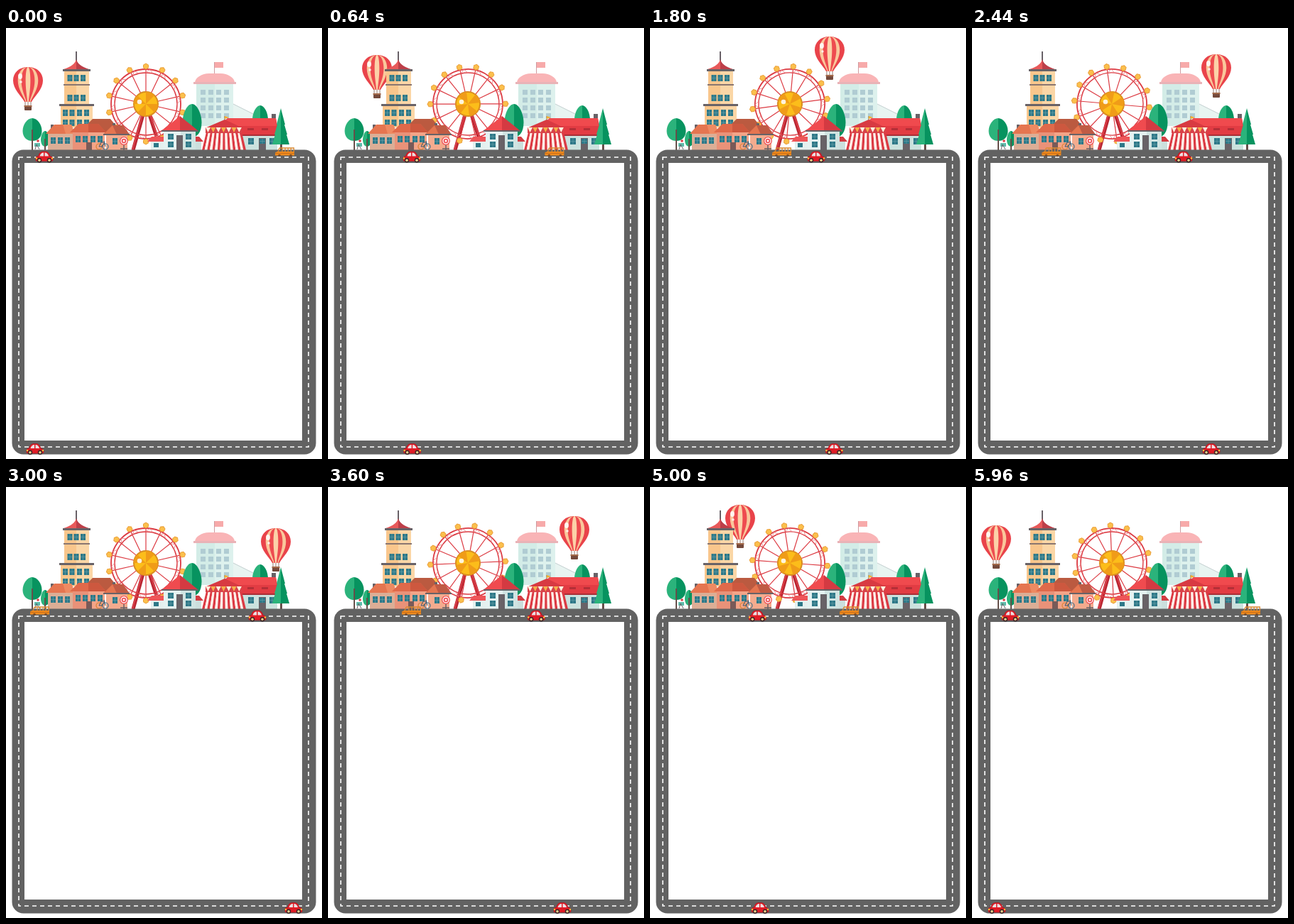
Recreate the animation shown at these times as an HTML page. Size 445 px wide and 607 px high, loop 6 s.

```html
<!DOCTYPE html>
<html lang="en">
<head>
<meta charset="utf-8">
<title>Town road frame</title>
<style>
html, body { margin: 0; width: 100%; height: 100%; overflow: hidden; background: #fff; }
svg { display: block; width: 100vw; height: 100vh; }
</style>
</head>
<body>
<svg id="stage" viewBox="0 0 445 607" xmlns="http://www.w3.org/2000/svg"></svg>
<script>
const LOOP = 6000, STEP = 40, TURN = 3000, LAST = 5960;
const TEAL = '#2d7888', GREY = '#686267', RED = '#dc3a42';

const rect = (x, y, w, h, fill, extra = '') =>
  `<rect x="${x}" y="${y}" width="${w}" height="${h}" fill="${fill}" ${extra}/>`;
const poly = (points, fill) => `<polygon points="${points}" fill="${fill}"/>`;
const path = (d, fill, extra = '') => `<path d="${d}" fill="${fill}" ${extra}/>`;
const line = (d, stroke, width = 1) => path(d, 'none', `stroke="${stroke}" stroke-width="${width}"`);
const circle = (x, y, r, fill, extra = '') => `<circle cx="${x}" cy="${y}" r="${r}" fill="${fill}" ${extra}/>`;
const group = (id, content) => `<g id="${id}">${content}</g>`;
const repeat = (n, draw) => Array.from({ length: n }, (_, i) => draw(i)).join('');

function panes(x, y, w = 7, h = 9) {
  return rect(x, y, w, h, TEAL) +
    line(`M${x + w / 2} ${y}v${h}M${x} ${y + h / 2}h${w}`, '#68a3aa', 0.6);
}
const paneRow = (xs, y, w, h) => xs.map(x => panes(x, y, w, h)).join('');

// Oval crown in two greens; (x, y) is the tip.
function leafTree(x, y, rx, h, trunk) {
  const side = s => `M${x} ${y}C${x + s * rx * 0.5} ${y} ${x + s * rx} ${y + h * 0.28} ${x + s * rx} ${y + h * 0.56}` +
    `S${x + s * rx * 0.55} ${y + h} ${x} ${y + h}Z`;
  return path(side(-1), '#2bb37b') + path(side(1), '#07935f') +
    (trunk ? line(`M${x} ${y + h * 0.5}V172`, '#66504a', 2) : '');
}

function tower() {
  return line('M99 33V48', GREY, 2) +
    path('M99 44Q97 53 81 58H99Z', '#e8595a') + path('M99 44Q101 53 117 58H99Z', '#bd3f49') +
    rect(82, 60, 17, 49, '#f9c68c') + rect(99, 60, 18, 49, '#fbd6a6') +
    rect(77, 110, 22, 30, '#f9c68c') + rect(99, 110, 23, 30, '#fbd6a6') +
    rect(80, 58, 39, 3, GREY) + rect(81, 79, 37, 2, '#8a7670') + rect(75, 107, 49, 3, GREY) +
    [66, 94].map(y => paneRow([86.5, 95.5, 105], y)).join('') +
    [115, 129].map(y => paneRow([80, 89.5, 100, 110], y)).join('');
}

function paleBuilding() {
  return poly('320,107 352,123 362,138 320,138', '#e8f4f1') + line('M320 107L362 128', '#c3cfd0') +
    line('M293.5 48V64', '#cf9ba0') + rect(294, 48, 12, 8, '#f7aaaa') +
    path('M266 77C266 70 276 64 286 64H302C312 64 322 70 322 77Z', '#f9b4b6') +
    rect(268, 79, 26, 59, '#d3ece7') + rect(294, 79, 26, 59, '#ddf1ed') +
    rect(264, 76, 60, 3, '#e9b3b7') +
    repeat(16, i => rect(274 + (i % 4) * 11, 87 + Math.floor(i / 4) * 11, 7, 7, '#b0ccd3'));
}

function leftHouses() {
  return rect(63, 136, 4, 9, GREY) + rect(59, 149, 36, 23, '#dcae96') +
    poly('56,149 68,136 92,136 97,149', '#e57550') + poly('80,136 92,136 97,149 84,149', '#ee8a62') +
    paneRow([63, 73, 83], 154, 7) +
    poly('113,137 122,128 147,128 156,139 140,148', '#bb5a40') +
    rect(94, 147, 22, 25, '#e99279') + rect(116, 147, 23, 25, '#f3a488') +
    poly('90,147 102,135 130,135 141,147', '#e0694a') + poly('116,135 130,135 141,147 116,147', '#cd583f') +
    paneRow([98, 108, 119, 129], 152, 7) + rect(113, 161, 8, 11, '#795a58') +
    rect(150, 134, 4, 5, GREY) + rect(141, 149, 30, 23, '#f4ab8e') +
    poly('137,150 150,137 165,137 174,150', '#c05b45') + poly('137,150 150,137 156,150', '#e57550') +
    rect(137, 149, 37, 2, GREY) + panes(150, 155);
}

function streetProps() {
  return rect(40, 162, 8, 5, '#5fbcab') + circle(45, 159, 1.8, RED) + line('M41 171L43 164L47 171', GREY) +
    circle(131, 167, 4, 'none', 'stroke="#d9822f" stroke-width="1.2"') +
    circle(140, 167, 4, 'none', 'stroke="#40718c" stroke-width="1.2"') +
    line('M131 167L134 161H139L135 167ZM140 167L138 159', '#36566d') +
    line('M166 164V172M161 170H171', GREY, 1.5) +
    circle(166, 159, 6, '#ef5357') + circle(166, 159, 4, 'none', 'stroke="#fff" stroke-width="1.3"') +
    circle(166, 159, 1.5, '#fff');
}

function whiteHouse() {
  return rect(204, 159, 20, 13, '#e4f0ef') + poly('199,160 205,153 223,153 223,160', '#ee5558') +
    rect(208, 162, 7, 6, TEAL) +
    rect(262, 159, 13, 13, '#cbdfdd') + poly('262,153 272,153 278,160 262,160', '#d33c43') +
    rect(222, 143, 24, 29, '#e5f2f1') + rect(246, 143, 21, 29, '#d0e4e2') +
    poly('219,145 245,124 245,145', '#f04b4f') + poly('245,124 271,145 245,145', '#d43a42') +
    rect(219, 144, 52, 2, GREY) +
    paneRow([228, 253], 149, 8, 8) + paneRow([228, 253], 160, 8, 8) + rect(240, 151, 9, 21, GREY);
}

function redHall() {
  return rect(374, 121, 6, 10, GREY) + rect(330, 150, 52, 22, '#cbe2de') +
    poly('298,140 312,127 380,127 385,151 328,151', '#e23c43') +
    poly('312,127 380,127 381,138 303,138', '#f04a4e') + rect(329, 150, 56, 2, '#a92f37') +
    paneRow([341, 371], 155, 8, 9) + rect(356, 155, 10, 17, GREY) + panes(357, 156, 8, 7) +
    rect(340, 141, 9, 3, '#b42f37') + rect(360, 141, 9, 3, '#b42f37');
}

function tent() {
  const stripes = 17, top = i => 282 + i * 50 / stripes, foot = i => 276 + i * 62 / stripes;
  return line('M308 124V130', '#9a783f') + poly('308,124 314,126 308,128', '#f5ad2e') +
    poly('280,141 308,129 334,141', '#d83a42') +
    repeat(stripes, i => poly(`${top(i)},147 ${top(i + 1)},147 ${foot(i + 1)},172 ${foot(i)},172`,
      i % 2 ? '#fff0e9' : '#dc3a43')) +
    rect(281, 140, 51, 8, '#d8434a') +
    repeat(7, i => poly(`${281 + i * 7.3},140 ${288 + i * 7.3},140 ${284.5 + i * 7.3},147`, i % 2 ? '#f6b04a' : '#fff2df'));
}

function pine() {
  return rect(386, 162, 3, 10, '#66504a') +
    poly('387,113 381,136 382,136 378,150 379,150 375,164 387,164', '#2bb37b') +
    poly('387,113 393,136 392,136 396,150 395,150 399,164 387,164', '#07935f');
}

function wheelRotor() {
  const turn = 360 / 14;
  const gondola = '<polygon points="0,-57 3.5,-55 3.5,-51 0,-49 -3.5,-51 -3.5,-55" ' +
    'fill="#fbc04d" stroke="#eba03a" stroke-width="1"/>';
  const sector = 'M0 0L0 -17A17 17 0 0 1 12 -12Z';
  return circle(0, 0, 49, 'none', `stroke="${RED}" stroke-width="1.8"`) +
    circle(0, 0, 44, 'none', `stroke="${RED}" stroke-width="1.4"`) +
    repeat(14, i => `<g transform="rotate(${i * turn})">` +
      line('M0 -17V-49', RED, 1.2) + line('M0 -44L5.5 -48.7L9.8 -42.9', '#e98589', 0.8) + gondola + '</g>') +
    circle(0, 0, 17, '#fcbd1a', 'stroke="#d98f22" stroke-width="2"') +
    repeat(4, i => path(sector, '#f09c18', `transform="rotate(${i * 90})"`));
}

function wheelLegs() {
  return line('M193 122L179 172M202 122L218 172', '#b92632', 5) + line('M192 122L178 172M203 122L219 172', '#d8404a', 2);
}

function balloon() {
  const envelope = k => `M0 0C${13 * k} 0 ${21 * k} 8 ${21 * k} 19C${21 * k} 31 ${10 * k} 40 ${5 * k} 49` +
    `H${-5 * k}C${-10 * k} 40 ${-21 * k} 31 ${-21 * k} 19C${-21 * k} 8 ${-13 * k} 0 0 0Z`;
  return line('M-4 49V55M4 49V55M0 49V55', '#795548', 0.8) +
    path(envelope(1), '#e9434a') + path(envelope(0.68), '#fac79b') +
    path(envelope(0.45), '#ee4c50') + path(envelope(0.16), '#fcd2a8') +
    '<ellipse cx="-11" cy="13" rx="3" ry="4" fill="#fff" opacity=".85"/>' +
    circle(-10, 21, 1.8, '#fff', 'opacity=".8"') +
    rect(-5, 54, 10, 7, '#74493b', 'rx="1"') + rect(-5.5, 54, 11, 2, '#a46a4a');
}

function car() {
  const wheel = x => circle(x, 4.2, 3.2, '#3a2428') + circle(x, 4.2, 1.8, '#f2cf8a');
  return path('M-12 4V1Q-12 -1.5 -8.5 -1.5Q-7 -8 -2 -8H2Q6 -8 8 -1.5Q12 -1 12 2V4Q12 5.5 10 5.5H-10Q-12 5.5 -12 4Z',
    '#e01c26', 'stroke="#a81a24" stroke-width=".7"') +
    path('M-6.5 -1.5Q-5 -6.5 -1 -6.5V-1.5ZM0.5 -1.5V-6.5Q4.5 -6.5 6 -1.5Z', '#ecdfe2') +
    wheel(-7) + wheel(7) +
    circle(-11, 1.5, 1.2, '#f9ca3d') + circle(11, 1.5, 1.2, '#f9ca3d');
}

// Open-sided bus: the street shows through its windows.
function bus() {
  return line('M-8 -5.5H13M-8 -5.5L-10 0' + repeat(5, i => `M${-4 + i * 4.1} -5.5V0`), '#d98a35', 1.3) +
    path('M-14 5V1L-11 -0.5H13V5Z', '#f08a1c') +
    line('M-14 2H13', '#c66d19') + circle(-8, 5, 1.8, '#7a4e2c') + circle(8, 5, 1.8, '#7a4e2c');
}

function road() {
  return rect(8.5, 171.5, 428, 429, '#626262', 'rx="16"') + rect(26, 190, 391, 391, '#fff') +
    rect(18, 182, 408, 408, 'none', 'stroke="#fff" stroke-width="1.6" stroke-dasharray="6 5"');
}

const stage = document.getElementById('stage');
stage.innerHTML = rect(0, 0, 445, 607, '#fff') +
  group('balloon', balloon()) + paleBuilding() + tower() +
  wheelLegs() + group('wheel', wheelRotor()) + circle(188, 104, 3.3, '#fff', 'opacity=".85"') +
  leafTree(262, 107, 13.5, 47) + leafTree(358, 109, 11, 36) +
  leafTree(37, 127, 13.5, 32, true) + leafTree(55, 145, 6, 22, true) +
  leftHouses() + whiteHouse() + redHall() + tent() + pine() + streetProps() +
  road() + group('bus', bus()) + group('topCar', car()) + group('lowCar', car());

// Balloon route: time, x, y of its top.
const route = [
  [0, 31, 55], [640, 69, 38], [1280, 165, 14], [1600, 219, 10], [1920, 272, 15], [2440, 344, 37],
  [3000, 380, 58], [3240, 373, 54], [3600, 347, 41], [3840, 321, 32],
  [4480, 213, 17], [5000, 127, 25], [5760, 42, 49], [5960, 34, 54]
];

function slope(i, axis) {
  const before = route[i - 1], after = route[i + 1];
  if (!before || !after || route[i][0] === TURN) return 0;
  return (after[axis] - before[axis]) / (after[0] - before[0]);
}

function along(t, axis) {
  const next = route.findIndex(key => key[0] > t);
  const i = next < 0 ? route.length - 2 : next - 1;
  const a = route[i], b = route[i + 1], span = b[0] - a[0], u = (t - a[0]) / span;
  return a[axis] + (b[axis] - a[axis]) * u * u * (3 - 2 * u) +
    span * u * (1 - u) * ((1 - u) * slope(i, axis) - u * slope(i + 1, axis));
}

function shuttle(t, start, far, end = start) {
  return t < TURN ? start + (far - start) * t / TURN
    : far + (end - far) * (t - TURN) / (LAST - TURN);
}

function place(id, x, y, angle = 0) {
  document.getElementById(id).setAttribute('transform', `translate(${x} ${y}) rotate(${angle})`);
}

function render(t) {
  place('wheel', 197, 107, t * 360 / LOOP);
  place('balloon', along(t, 1), along(t, 2));
  place('topCar', shuttle(t, 54, 354), 182);
  place('lowCar', shuttle(t, 41, 405, 35), 593.5);
  place('bus', shuttle(t, 393, 48), 174.5);
}

const begin = performance.now();
function tick() {
  const t = (performance.now() - begin) % LOOP;
  render(Math.floor(t / STEP) * STEP);
  requestAnimationFrame(tick);
}
render(0);
requestAnimationFrame(tick);
</script>
</body>
</html>
```
